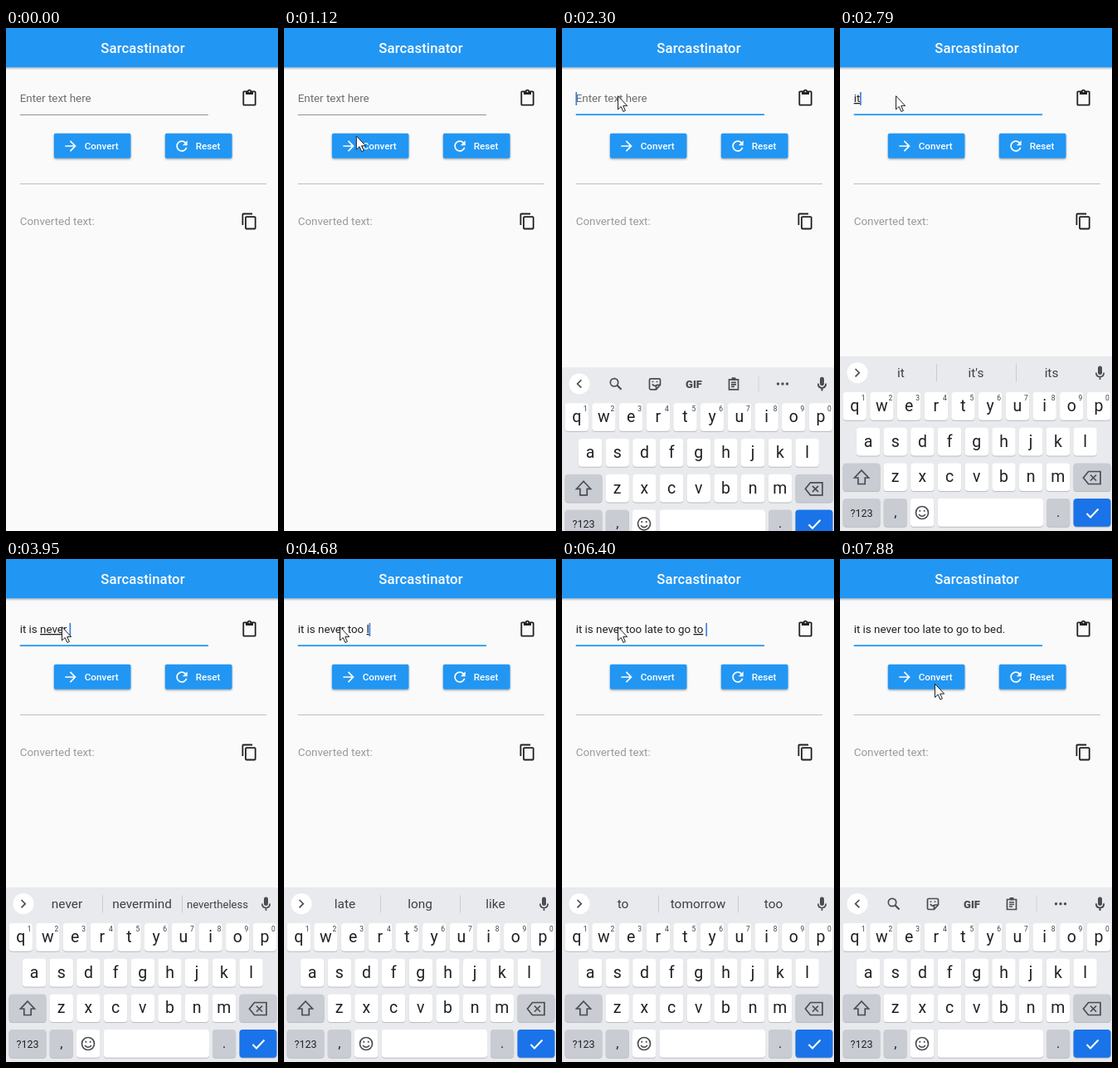
Recreate the animation shown at these times as an HTML page. Size 328x605 px, loop 8000 ms.

```html
<!DOCTYPE html>
<html lang="en">
<head>
<meta charset="utf-8">
<title>Sarcastinator</title>
<style>
html, body { margin: 0; height: 100%; overflow: hidden; background: #fafafa; }
svg { display: block; width: 100%; height: 100%; }
text { font: 13.36px Roboto, sans-serif; white-space: pre; }
.title { font-size: 16.7px; font-weight: 500; letter-spacing: .1px; fill: #fff; }
.label { font-size: 11.7px; font-weight: 500; fill: #fff; }
.key { font-size: 19.5px; fill: #202124; }
.digit { font-size: 8.5px; fill: #3c4043; }
.word { font-size: 15.4px; fill: #3c4043; }
.mid { text-anchor: middle; }
.line { fill: none; stroke: #4a4d51; stroke-width: 1.7; }
.composing { text-decoration: underline; text-decoration-thickness: 1px; }
</style>
</head>
<body>
<svg viewBox="0 0 328 605">
  <defs>
    <filter id="shadow" x="-10%" y="-20%" width="120%" height="160%">
      <feDropShadow dx="0" dy="1.2" stdDeviation="1.2" flood-opacity=".35"/>
    </filter>
  </defs>
  <rect width="328" height="605" fill="#fafafa"/>
  <rect x="-9" y="-9" width="346" height="56.3" fill="#2196f3" filter="url(#shadow)"/>
  <text class="title mid" x="165" y="30">Sarcastinator</text>

  <text id="hint" x="16.7" y="89" fill="#6e6e6e">Enter text here</text>
  <text id="field" x="16.7" y="89" fill="#212121"><tspan></tspan><tspan class="composing"></tspan><tspan></tspan></text>
  <rect id="border" x="16.7" width="227.3"/>
  <rect id="caret" y="77" width="1.7" height="16" fill="#3f80e0"/>

  <g fill="#2196f3" filter="url(#shadow)">
    <rect x="57.8" y="126.8" width="92.7" height="30" rx="2"/>
    <rect x="191.8" y="126.8" width="80.8" height="30" rx="2"/>
  </g>
  <path fill="#fff" transform="translate(68 132) scale(.835)" d="M12 4l-1.41 1.41L16.17 11H4v2h12.17l-5.58 5.59L12 20l8-8z"/>
  <path fill="#fff" transform="translate(202 132) scale(.835)" d="M17.65 6.35C16.2 4.9 14.21 4 12 4c-4.42 0-7.99 3.58-7.99 8s3.57 8 7.99 8c3.73 0 6.84-2.55 7.73-6h-2.08c-.82 2.33-3.04 4-5.65 4-3.31 0-6-2.69-6-6s2.69-6 6-6c1.66 0 3.14.69 4.22 1.78L13 11h7V4z"/>
  <text class="label" x="94.7" y="146.2">Convert</text>
  <text class="label" x="228.7" y="146.2">Reset</text>

  <rect x="16.7" y="187" width="297.3" height="1" fill="#bdbdbd"/>
  <text x="16.7" y="237.3" fill="#9a9a9a">Converted text:</text>
  <g fill="#212121">
    <path transform="translate(282.7 73.7) scale(.9)" d="M19 2h-4.18C14.4.84 13.3 0 12 0c-1.3 0-2.4.84-2.82 2H5c-1.1 0-2 .9-2 2v16c0 1.1.9 2 2 2h14c1.1 0 2-.9 2-2V4c0-1.1-.9-2-2-2zm-7 0c.55 0 1 .45 1 1s-.45 1-1 1-1-.45-1-1 .45-1 1-1zm7 18H5V4h2v3h10V4h2v16z"/>
    <path transform="translate(282.7 221.7) scale(.9)" d="M16 1H4c-1.1 0-2 .9-2 2v14h2V3h12V1zm3 4H8c-1.1 0-2 .9-2 2v14c0 1.1.9 2 2 2h11c1.1 0 2-.9 2-2V7c0-1.1-.9-2-2-2zm0 16H8V7h11v14z"/>
  </g>

  <g id="keyboard">
    <rect y="395" width="328" height="212" fill="#e8eaed"/>
    <circle cx="21" cy="414.7" r="12.5" fill="#fff"/>
    <path id="chevron" class="line"/>
    <g id="tools">
      <g class="line">
        <circle cx="63" cy="413" r="4.7"/><path d="M66.5 416.500l5 5" stroke-width="2.2"/>
        <path d="M107 408.500h10q1.500 0 1.500 1.500v6l-5 5.500h-6.500q-1.500 0-1.500-1.500v-10q0-1.500 1.500-1.500zM118.500 416h-3.500q-1.500 0-1.500 1.500v4M109 415q2 3.500 5 1M109.500 411.500v1.500M114.500 411.500v1.500"/>
        <path d="M201.500 409.500h11v12h-11zM204 413h6M204 415.500h6M204 418h4"/>
        <path d="M308.800 414.500q0 5 4.700 5t4.700-5M313.500 419.500v3.500" id="stand"/>
      </g>
      <rect x="204.500" y="407" width="5" height="3.500" rx="1" fill="#4a4d51"/>
      <text class="mid" x="159" y="419.500" style="font-size:13px;font-weight:900" fill="#4a4d51">GIF</text>
      <rect x="236.500" y="405" width="1" height="20" fill="#d0d3d7"/>
      <g fill="#4a4d51"><circle cx="260.500" cy="414.700" r="1.700"/><circle cx="266" cy="414.700" r="1.700"/><circle cx="271.500" cy="414.700" r="1.700"/></g>
    </g>
    <g id="words">
      <path d="M116.500 404.500v21M212.500 404.500v21" stroke="#c8cbcf"/>
      <text class="word mid" x="73.500" y="420.300"></text>
      <text class="word mid" x="164" y="420.300"></text>
      <text class="word mid" x="255" y="420.300"></text>
    </g>
    <rect x="311" y="406.500" width="5" height="10.500" rx="2.500" fill="#4a4d51"/>
    <path class="line" d="M308.800 414.500q0 5 4.700 5t4.700-5M313.500 419.500v3.500"/>
    <g id="keys"></g>
    <g class="line">
      <path d="M26 532l8.500 9h-4.300v7.500h-8.400v-7.500h-4.300z"/>
      <path d="M299.500 533.500h14.500v15h-14.500l-6-7.500zM302 537.500l7 7M309 537.500l-7 7"/>
      <circle cx="99" cy="583" r="7.500"/>
      <path d="M95 585q4 4.500 8 0M96.300 579.800v2M101.700 579.800v2"/>
    </g>
    <path d="M297.500 584l4.500 4.500 9.500-10" fill="none" stroke="#fff" stroke-width="2"/>
  </g>

  <path id="pointer" d="M.5.700v16.300l3.700-3.500 2.700 6 2.500-1.100-2.700-5.800h5z" fill="#fff" stroke="#222"/>
</svg>
<script>
const $ = id => document.getElementById(id);
const LOOP = 8000;

function drawKeys() {
  let out = '';
  const key = (x, y, w, fill = '#fff') => {
    for (const [dy, color] of [[1, '#b9bcc1'], [0, fill]])
      out += `<rect x="${x}" y="${y + dy}" width="${w}" height="33.700" rx="4" fill="${color}"/>`;
  };
  const label = (s, x, y, cls = 'key', style = '') =>
    out += `<text class="${cls} mid" x="${x}" y="${y}" style="${style}">${s}</text>`;
  [['qwertyuiop', 17.7], ['asdfghjkl', 34], ['zxcvbnm', 66.7]].forEach(([row, left], r) =>
    [...row].forEach((ch, i) => {
      const x = left + i * 32.7, y = 438 + r * 42.7;
      key(x - 14.2, y, 28.4);
      label(ch, x, y + 23);
      if (!r) label((i + 1) % 10, x + 10.5, y + 9.7, 'digit');
    }));
  const gray = '#c9ccd2';
  key(3.5, 523.4, 45, gray);
  key(281.5, 523.4, 45, gray);
  key(3.5, 566.1, 45, gray);
  key(52.7, 566.1, 28.2, gray);
  key(85, 566.1, 28.4);
  key(117.7, 566.1, 127.3);
  key(249, 566.1, 28.2, gray);
  key(281.5, 566.1, 45, '#1a73e8');
  label('?123', 26, 587.7, 'key', 'font-size:12.5px');
  label(',', 66.8, 588, 'key', 'font-size:16px');
  label('.', 263, 588, 'key', 'font-size:16px');
  $('keys').innerHTML = out;
}

// time, typed text, last word still being composed, suggestions (none: tool strip)
const typing = [
  [0, '', 0],
  [2700, 'i', 1, 'i in is'],
  [2790, 'it', 1, "it it's its"],
  [2880, 'it ', 1, "it it's its"],
  [3030, 'it ', 0, 'is was will'],
  [3120, 'it i', 1, 'is in it'],
  [3200, 'it is', 1, "is isn't it"],
  [3270, 'it is ', 0, 'a the not'],
  [3380, 'it is n', 1, 'not now no'],
  [3500, 'it is ne', 1, 'new next need'],
  [3690, 'it is nev', 1, 'never Nevada nevermind'],
  [3770, 'it is neve', 1, 'never nevermind nevertheless'],
  [3920, 'it is never', 1, 'never nevermind nevertheless'],
  [3950, 'it is never ', 1, 'never nevermind nevertheless'],
  [4100, 'it is never ', 0, 'too a going'],
  [4280, 'it is never t', 1, 'the to too'],
  [4380, 'it is never to', 1, 'to too told'],
  [4520, 'it is never too', 1, 'too took tool'],
  [4600, 'it is never too ', 0, 'late much many'],
  [4680, 'it is never too l', 1, 'late long like'],
  [4820, 'it is never too la', 1, 'late last large'],
  [4880, 'it is never too lat', 1, 'late later latest'],
  [5060, 'it is never too late', 1, 'late later lately'],
  [5210, 'it is never too late t', 1, 'to the today'],
  [5370, 'it is never too late to', 1],
  [5430, 'it is never too late to', 1, 'to today too'],
  [5630, 'it is never too late to ', 1, 'to today too'],
  [5850, 'it is never too late to g', 1, 'get go give'],
  [5930, 'it is never too late to go', 1, 'go good going'],
  [6000, 'it is never too late to go ', 1, 'go good going'],
  [6080, 'it is never too late to go ', 0, 'to back out'],
  [6230, 'it is never too late to go t', 1, 'to the through'],
  [6310, 'it is never too late to go to', 1, 'to tomorrow too'],
  [6400, 'it is never too late to go to ', 1, 'to tomorrow too'],
  [6500, 'it is never too late to go to ', 0, 'the bed sleep'],
  [6620, 'it is never too late to go to b', 1, 'be bed but'],
  [6770, 'it is never too late to go to be', 1, 'be bed better'],
  [6880, 'it is never too late to go to bed', 1, 'bed beds bedtime'],
  [6960, 'it is never too late to go to bed ', 0, 'and at early'],
  [7150, 'it is never too late to go to bed.', 0]
];

const clamp = v => Math.min(1, Math.max(0, v));
const part = (t, a, b) => clamp((t - a) / (b - a));
const smooth = p => p * p * (3 - 2 * p);
const mix = (a, b, p) => a + (b - a) * p;

function along(points, t) {
  const i = points.findIndex(p => p[0] > t);
  if (i < 0) return points[points.length - 1][1];
  if (!i) return points[0][1];
  const [a, b] = [points[i - 1], points[i]];
  return mix(a[1], b[1], part(t, a[0], b[0]));
}

const bezier = (a, b, c, d, p) => {
  const q = 1 - p;
  return q * q * q * a + 3 * q * q * p * b + 3 * q * p * p * c + p * p * p * d;
};

function pointerAt(t) {
  if (t < 1200) {
    const p = smooth(part(t, 390, 1180));
    return [bezier(0, 150, 185, 82, p), bezier(605, 520, 250, 123, p)];
  }
  const p = part(t, 1180, 1360), q = smooth(part(t, 7590, 7880));
  const y = t < 1540 ? mix(123, 82, p) : 81;
  return [mix(mix(82, 67, p), 114, q), mix(y, 149.5, q)];
}

const slide = [[2090, 210], [2150, 193], [2200, 112], [2250, 46], [2300, 13.5], [2350, 3], [2400, 0]];

function drawTyping(t) {
  const [, text, composing, words] = typing.filter(row => row[0] <= t).pop();
  const body = text.trimEnd();
  const start = composing ? body.lastIndexOf(' ') + 1 : body.length;
  const spans = $('field').children;
  spans[0].textContent = text.slice(0, start);
  spans[1].textContent = text.slice(start, body.length);
  spans[2].textContent = text.slice(body.length);
  $('hint').style.display = text ? 'none' : '';
  $('caret').setAttribute('x', 16.4 + (text ? $('field').getComputedTextLength() : 0));
  $('caret').style.display = t >= 1730 && t < 7640 ? '' : 'none';

  $('tools').style.display = words ? 'none' : '';
  $('words').style.display = words ? '' : 'none';
  $('chevron').setAttribute('d', words ? 'M18.500 410l4.700 4.700-4.700 4.700' : 'M23.300 410l-4.700 4.700 4.700 4.700');
  if (words) words.split(' ').forEach((word, i) => {
    const el = $('words').querySelectorAll('text')[i];
    el.textContent = word;
    el.style.fontSize = word.length > 10 ? '13.1px' : '';
  });
}

function draw(t) {
  const focus = part(t, 1680, 1870);
  $('border').setAttribute('y', mix(104, 103.3, focus));
  $('border').setAttribute('height', mix(1, 1.8, focus));
  $('border').setAttribute('fill', `rgb(${mix(145, 33, focus)},${mix(145, 150, focus)},${mix(145, 243, focus)})`);
  drawTyping(t);
  $('keyboard').setAttribute('transform', `translate(0 ${along(slide, t)})`);
  $('keyboard').style.display = t < 2100 ? 'none' : '';
  $('pointer').setAttribute('transform', `translate(${pointerAt(t)})`);
  $('pointer').style.display = t < 430 ? 'none' : '';
}

drawKeys();
const began = performance.now();
function tick() {
  draw((performance.now() - began) % LOOP);
  requestAnimationFrame(tick);
}
tick();
</script>
</body>
</html>
```
